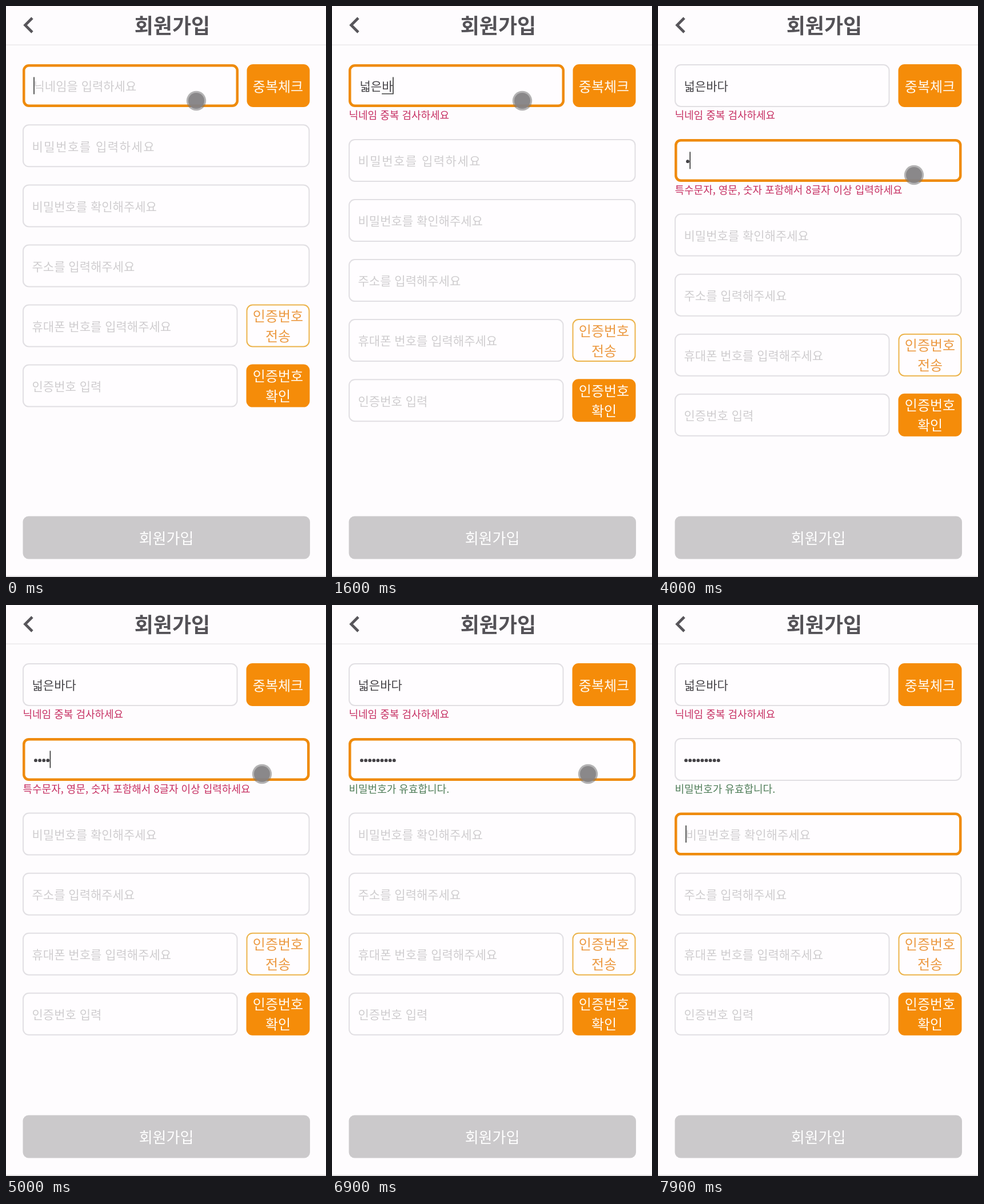
An HTML page for the animation above (8000 ms loop, 560 by 1000 pixels).

```html
<!DOCTYPE html>
<html lang="ko">
<head>
<meta charset="utf-8">
<title>회원가입</title>
<style>
html, body { margin: 0; width: 100%; height: 100%; overflow: hidden; background: #fefcfe; }
svg { display: block; width: 560px; height: 1000px; }
text { font-family: "Noto Sans CJK KR", "Noto Sans KR", "Noto Sans CJK", "Noto Sans CJK JP", sans-serif; white-space: pre; }
</style>
</head>
<body>
<svg id="stage" viewBox="0 0 560 1000"></svg>
<script>
const LOOP = 8000, STEP = 100;
const ORANGE = '#f58c09', GREY = '#e1dfe3', HINT = '#cfcdcf', INK = '#444246';
const BAD = '#c62f62', GOOD = '#4f7d58';
const SIZE = 21, ADVANCE = SIZE * 0.92, DOT = 7.1;
const SHIFT = 25.6;

// [time, value] tables; the last entry not later than t applies
const nameKeys = [
  [300, 'ㄴ'], [400, '너'], [600, '널'], [700, '넓'], [900, '넓ㅇ'], [1000, '넓으'],
  [1200, '넓은'], [1300, '넓은ㅂ'], [1600, '넓은바'], [1800, '넓은받'], [1900, '넓은바다']
];
const passKeys = [3800, 4500, 4700, 4900, 5100, 5300, 5500, 5700, 6300].map((t, i) => [t, i + 1]);
const focusAt = [[0, 0], [2800, 1], [7700, 2]];
const pointerPath = [
  [0, 333, 166], [2100, 333, 166], [2700, 448, 296],
  [7500, 448, 296], [7700, 500, 402], [7900, 590, 412]
];

const at = (table, t) => table.filter(k => k[0] <= t).pop();

function pointerAt(t) {
  const i = pointerPath.findIndex(p => p[0] > t);
  if (i < 0) return null;
  const [t0, x0, y0] = pointerPath[i - 1], [t1, x1, y1] = pointerPath[i];
  const u = (t - t0) / (t1 - t0), e = u * u * (3 - 2 * u);
  return [x0 + (x1 - x0) * e, y0 + (y1 - y0) * e];
}

// y is the visual middle of the line
function text(str, x, y, size, fill, opt = '') {
  return `<text x="${x}" y="${y + size * 0.375}" font-size="${size}" fill="${fill}" ${opt}>${str}</text>`;
}

function box(x, y, w, h, r, fill, stroke = 'none', sw = 0) {
  return `<rect x="${x + sw / 2}" y="${y + sw / 2}" width="${w - sw}" height="${h - sw}" rx="${r - sw / 2}" fill="${fill}" stroke="${stroke}" stroke-width="${sw}"/>`;
}

function field(y, right, focused) {
  return focused
    ? box(29, y, right - 29, 75, 11, '#fffdff', '#ef8b0c', 4.5)
    : box(29, y, right - 29, 75, 11, '#fffdff', GREY, 2);
}

function button(y, lines, filled, left = 420.5) {
  const ink = filled ? '#fffaf2' : '#ec9a42';
  const shape = filled ? box(left, y, 531.5 - left, 75, 11, ORANGE)
    : box(left, y, 531.5 - left, 75, 11, '#fffdff', '#ecb44c', 2);
  const mid = 'text-anchor="middle" font-weight="500"';
  const tops = lines.length > 1 ? [20.5, 55.5] : [38.5];
  return shape + lines.map((s, i) => text(s, 476, y + tops[i], 24, ink, mid)).join('');
}

const caret = (x, y) => `<rect x="${x - 0.8}" y="${y + 22.5}" width="1.6" height="30" fill="#333"/>`;

const frame =
  box(0, 0, 560, 1000, 0, '#fefcfe') +
  '<path d="M46 21L33.5 33.5L46 46" fill="none" stroke="#57555a" stroke-width="4.6"/>' +
  text('회원가입', 291, 34, 36, '#545257', 'text-anchor="middle" font-weight="700"') +
  box(0, 67.5, 560, 1.5, 0, '#ebe9eb') +
  box(29.5, 893.5, 502.5, 75, 10, '#cbc9cb') +
  text('회원가입', 280.5, 932, 26, '#fff', 'text-anchor="middle"') +
  box(0, 998, 560, 2, 0, '#e2e0e2');

function draw(t) {
  const [focusTime, focus] = at(focusAt, t);
  const nameKey = at(nameKeys, t), passKey = at(passKeys, t);
  const name = nameKey ? nameKey[1] : '', dots = passKey ? passKey[1] : 0;
  const lastKey = [nameKey, passKey][focus];
  const since = t - Math.max(focusTime, lastKey ? lastKey[0] : 0);
  const blinkOn = Math.floor(since / 500) % 2 === 0;

  const d1 = name ? SHIFT : 0, d2 = d1 + (dots ? SHIFT : 0);
  const tops = [102, 207.3 + d1, 312.4 + d2, 417.5 + d2, 522.5 + d2, 627.6 + d2];
  const rights = [focus === 0 ? 407 : 405.5, 531.5, 531.5, 531.5, 405.5, 405.5];
  const hints = ['닉네임을 입력하세요', '비밀번호를 입력하세요', '비밀번호를 확인해주세요',
    '주소를 입력해주세요', '휴대폰 번호를 입력해주세요', '인증번호 입력'];
  const filled = [name, dots];

  let out = frame;
  tops.forEach((y, i) => {
    const x = i === focus ? 48.5 : 45.5;
    out += field(y, rights[i], i === focus);
    if (!filled[i]) {
      out += text(hints[i], x, y + 38.5, SIZE, HINT, i === 1 ? 'letter-spacing="1.5"' : '');
    }
  });

  const nameX = focus === 0 ? 48.5 : 45.5;
  if (name) {
    out += text(name, nameX, tops[0] + 38.5, SIZE, INK);
    out += text('닉네임 중복 검사하세요', 29.5, 191.5, 18, BAD);
    if (focus === 0 && t < 2100) {
      out += box(nameX + (name.length - 1) * ADVANCE, 153, ADVANCE, 1.5, 0, '#444');
    }
  }

  const dotX = focus === 1 ? 52 : 49;
  for (let i = 0; i < dots; i++) {
    out += `<circle cx="${dotX + i * DOT}" cy="${tops[1] + 39.3}" r="2.9" fill="${INK}"/>`;
  }
  if (dots) {
    const ok = dots > 8;
    out += text(ok ? '비밀번호가 유효합니다.' : '특수문자, 영문, 숫자 포함해서 8글자 이상 입력하세요',
      29.5, tops[1] + 89, 18, ok ? GOOD : BAD);
  }

  out += button(tops[0], ['중복체크'], true, focus === 0 ? 421.5 : 420.5);
  out += button(tops[4], ['인증번호', '전송'], false);
  out += button(tops[5], ['인증번호', '확인'], true);

  if (blinkOn) {
    const lead = [name.length * ADVANCE, dots * DOT, 0][focus];
    out += caret(49 + lead, tops[focus]);
  }

  const p = pointerAt(t);
  if (p) {
    out += `<g transform="translate(${p[0]} ${p[1]})"><circle r="17.2" fill="#777" opacity=".55"/>` +
      '<circle r="14" fill="#858385" opacity=".9"/></g>';
  }
  return out;
}

const stage = document.getElementById('stage');
const start = performance.now();
let shown = -1;
function tick() {
  const t = Math.floor(((performance.now() - start) % LOOP) / STEP) * STEP;
  if (t !== shown) {
    shown = t;
    stage.innerHTML = draw(t);
  }
  requestAnimationFrame(tick);
}
tick();
</script>
</body>
</html>
```
